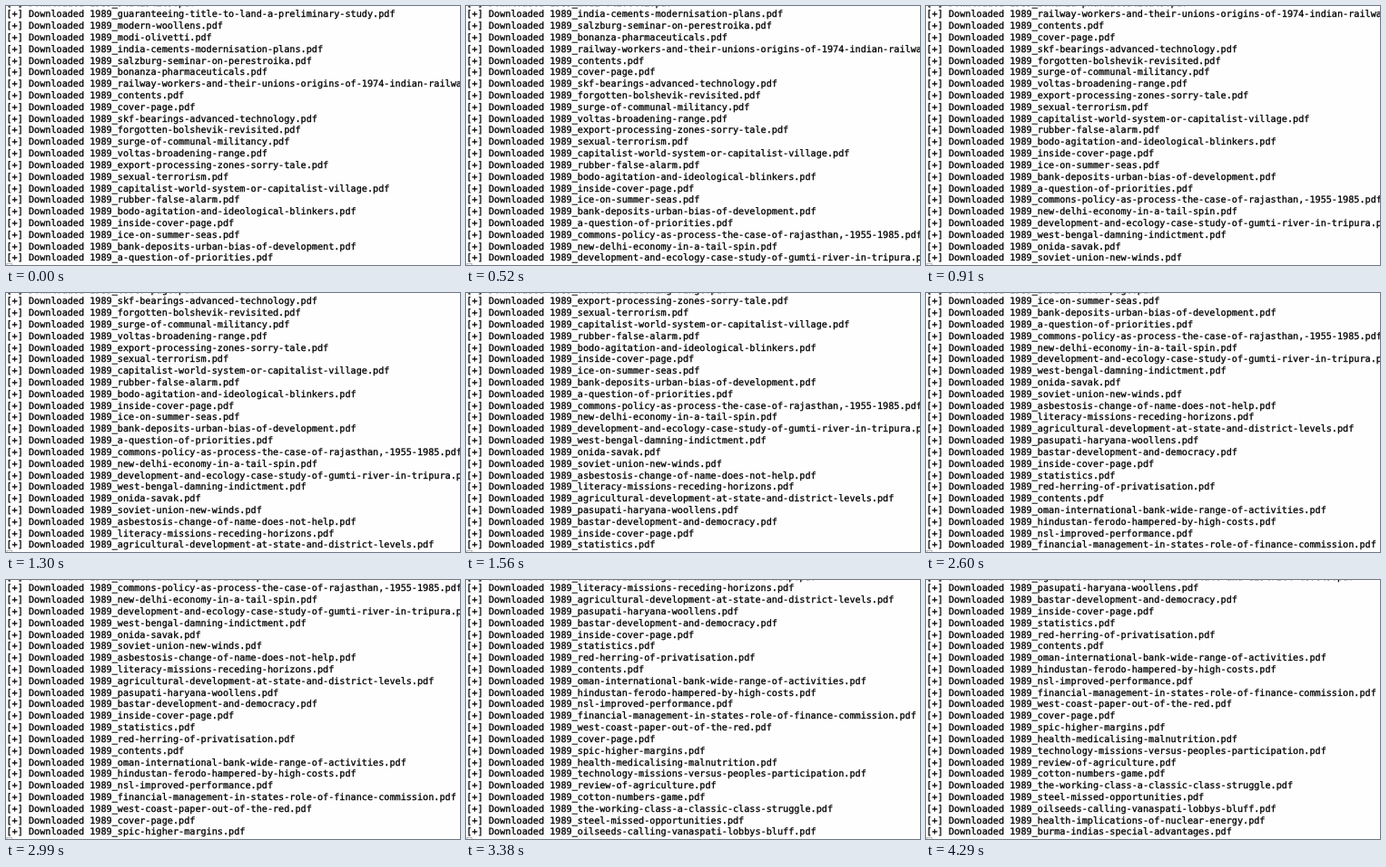
An HTML page that plays this animation: 500 by 286 pixels, repeating every 4.42 s.

```html
<!DOCTYPE html>
<html lang="en">
<head>
<meta charset="utf-8">
<title>Download log</title>
<style>
  html, body { margin: 0; height: 100%; overflow: hidden; background: #fefeff; }
  svg { display: block; }
  text {
    font: 10.17px "DejaVu Sans Mono", monospace;
    text-rendering: geometricPrecision;
    fill: #000;
    stroke: #000;
    stroke-width: .3px;
  }
</style>
</head>
<body>
<svg width="500" height="286" viewBox="0 0 500 286">
  <g id="log"></g>
  <rect x="1" y="284.5" width="5.5" height="12" fill="none" stroke="#a8a8a8" stroke-width=".8"/>
</svg>
<script>
const titles = `statistics
guaranteeing-title-to-land-a-preliminary-study
modern-woollens
modi-olivetti
india-cements-modernisation-plans
salzburg-seminar-on-perestroika
bonanza-pharmaceuticals
railway-workers-and-their-unions-origins-of-1974-indian-railway-strike
contents
cover-page
skf-bearings-advanced-technology
forgotten-bolshevik-revisited
surge-of-communal-militancy
voltas-broadening-range
export-processing-zones-sorry-tale
sexual-terrorism
capitalist-world-system-or-capitalist-village
rubber-false-alarm
bodo-agitation-and-ideological-blinkers
inside-cover-page
ice-on-summer-seas
bank-deposits-urban-bias-of-development
a-question-of-priorities
commons-policy-as-process-the-case-of-rajasthan,-1955-1985
new-delhi-economy-in-a-tail-spin
development-and-ecology-case-study-of-gumti-river-in-tripura
west-bengal-damning-indictment
onida-savak
soviet-union-new-winds
asbestosis-change-of-name-does-not-help
literacy-missions-receding-horizons
agricultural-development-at-state-and-district-levels
pasupati-haryana-woollens
bastar-development-and-democracy
inside-cover-page
statistics
red-herring-of-privatisation
contents
oman-international-bank-wide-range-of-activities
hindustan-ferodo-hampered-by-high-costs
nsl-improved-performance
financial-management-in-states-role-of-finance-commission
west-coast-paper-out-of-the-red
cover-page
spic-higher-margins
health-medicalising-malnutrition
technology-missions-versus-peoples-participation
review-of-agriculture
cotton-numbers-game
the-working-class-a-classic-class-struggle
steel-missed-opportunities
oilseeds-calling-vanaspati-lobbys-bluff
health-implications-of-nuclear-energy
burma-indias-special-advantages`.split('\n');

// [time in ms, lines scrolled so far]
const steps = [
  [0, 0], [130, 1], [260, 2], [520, 3], [650, 4], [910, 6],
  [1040, 7], [1170, 8], [1300, 9], [1430, 11], [1560, 13], [1690, 14], [1820, 16],
  [2210, 17], [2600, 19], [2730, 20], [2990, 22], [3120, 24], [3380, 29],
  [3770, 30], [4290, 31]
];
const LOOP = 4420, ROWS = 23, PITCH = 12.81, LAST_BASELINE = 281.4;

// The top row is nearly off stage: only its descenders show.
const rows = Array.from({ length: ROWS }, (_, i) => {
  const row = document.createElementNS('http://www.w3.org/2000/svg', 'text');
  row.setAttribute('x', 0.5);
  row.setAttribute('y', LAST_BASELINE - (ROWS - 1 - i) * PITCH);
  return document.getElementById('log').appendChild(row);
});

let shown = -1;
function draw() {
  const time = performance.now() % LOOP;
  const scrolled = steps.findLast(([start]) => start <= time)[1];
  if (scrolled !== shown) {
    rows.forEach((row, i) => {
      row.textContent = `[+] Downloaded 1989_${titles[scrolled + i]}.pdf`;
    });
    shown = scrolled;
  }
  requestAnimationFrame(draw);
}
draw();
</script>
</body>
</html>
```
